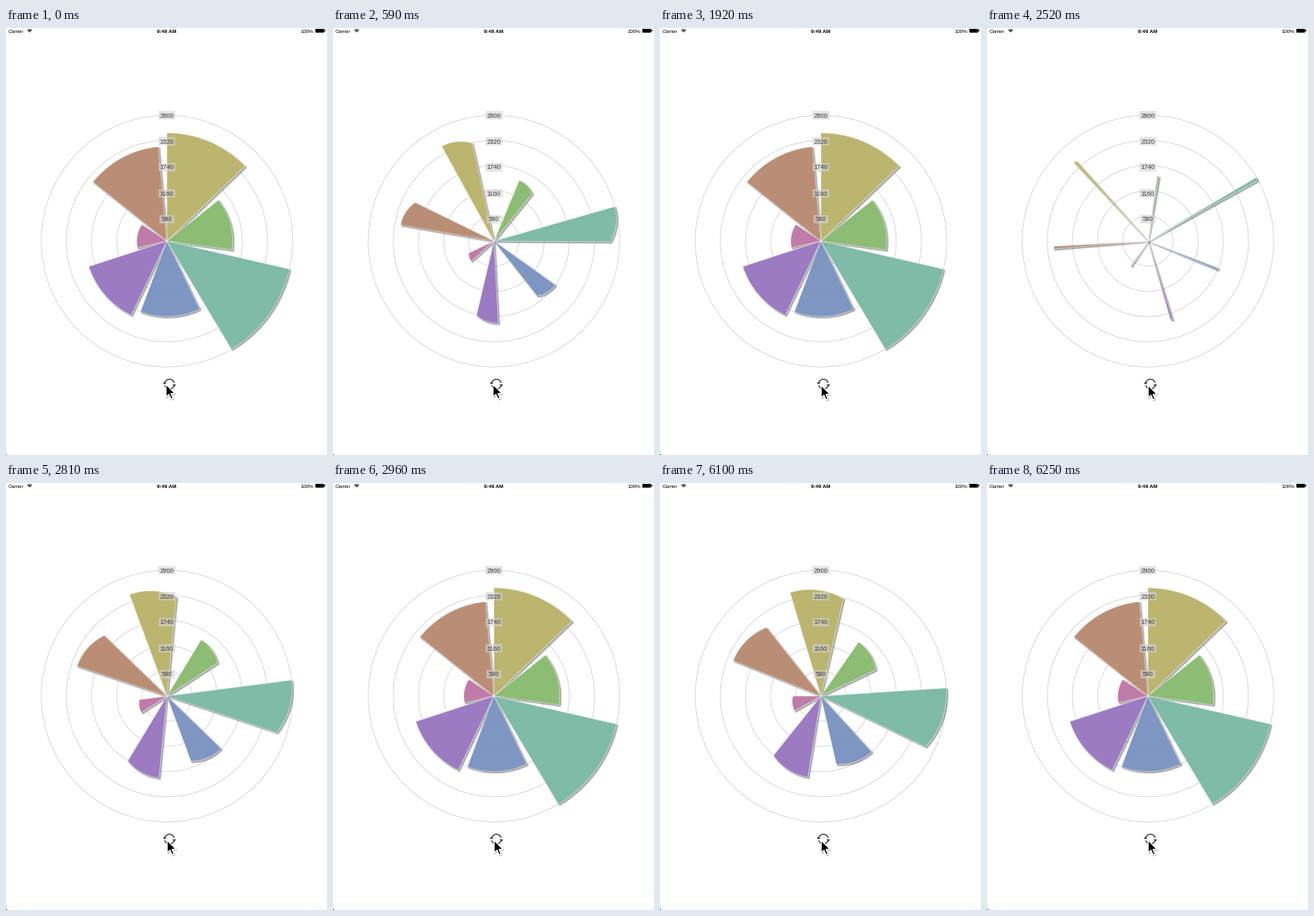
A matplotlib script for the animation above (8000 ms loop, 383x509 px).

```python
import numpy as np
import matplotlib.pyplot as plt
from matplotlib.animation import FuncAnimation
from matplotlib.patches import Circle, Polygon, Rectangle, Arc, Wedge, FancyBboxPatch

W, H, DPI = 383, 509, 100
PX = 72 / DPI
LOOP, STEP = 8000, 20

CX, CY = 192, 254
SLOT = 360 / 7
SPREAD = SLOT * 0.9
TURN = 45
DURATION = 520
STARTS = (300, 2440, 5700)
# the picture only refreshes at these moments
TICKS = np.array([0, 300, 450, 590, 740, 890, 1040, 1190, 1330, 1480, 1630,
                  1780, 1920, 2520, 2670, 2810, 2960, 5810, 5950, 6100, 6250])
POINTER = [(0, 191, 425), (1190, 195, 426), (1330, 203, 430), (1480, 216, 440),
           (1630, 199, 437), (1780, 195, 429), (1920, 192.3, 426)]
SECTORS = [(129, "#bdb56c"), (78.5, "#8bbd70"), (150, "#7cbca5"), (90, "#7b94c2"),
           (98, "#9a78c3"), (36, "#c079a8"), (113, "#bb8c72")]

plt.rcParams["font.family"] = "Liberation Sans"
fig = plt.figure(figsize=(W / DPI, H / DPI), dpi=DPI, facecolor="white")
ax = fig.add_axes([0, 0, 1, 1])
ax.set_xlim(0, W)
ax.set_ylim(H, 0)
ax.axis("off")


def text(x, y, s, size, **kw):
    kw = {"ha": "center", "va": "center_baseline", **kw}
    return ax.text(x, y, s, fontsize=size * PX, **kw)


def shape(patch):
    return ax.add_patch(patch)


def draw_status_bar():
    text(3, 3.6, "Carrier", 6.2, ha="left", color="black")
    text(192, 3.6, "9:49 AM", 6.1, weight="bold")
    text(367, 3.6, "100%", 6.2, ha="right", color="black")
    for r in (1.2, 2.7, 4.2):
        shape(Wedge((28.2, 5.6), r, 225, 315, width=0.9, color="black", lw=0))
    shape(FancyBboxPatch((369.5, 1.4), 9.6, 3.6, fc="black", ec="black", lw=0.5 * PX,
                         boxstyle="round,pad=0.2,rounding_size=0.6"))
    shape(Rectangle((380, 2.4), 1, 1.8, color="black", lw=0))


def draw_scale():
    for k in range(1, 6):
        shape(Circle((CX, CY), 30 * k, fill=False, ec="0.8", lw=0.7 * PX))
        y = 228 - 31 * (k - 1)
        half = 9 if k == 1 else 10.2
        shape(Rectangle((CX - half, y - 4.6), 2 * half, 9.2, fc="0.82", alpha=0.6,
                        lw=0, zorder=5))
        text(CX, y, str(580 * k), 7.6, color="0.25", zorder=6)


def draw_refresh():
    x, y, r, ink = 195, 424.5, 5.8, "0.25"
    for lo, hi in ((190, 345), (10, 165)):
        shape(Arc((x, y), 2 * r, 2 * r, theta1=lo, theta2=hi, color=ink,
                  lw=1.3 * PX, zorder=7))
    for side in (-1, 1):
        hx, hy = x + side * r, y + side * 1.2
        head = [(hx - 2.2, hy - side), (hx + 2.2, hy - side), (hx, hy + side * 2.2)]
        shape(Polygon(head, color=ink, lw=0, zorder=7))


def unit(deg):
    a = np.radians(deg)
    return np.stack([np.sin(a), -np.cos(a)], axis=-1)


def sector_path(i, q):
    """Sector outline whose arc opens out of its leading corner while it turns."""
    first = SLOT * i - TURN * (1 - q)
    arc = (1 - q) * unit(first) + q * unit(first + np.linspace(0, SPREAD, 40))
    return np.vstack([[CX, CY], [CX, CY] + SECTORS[i][0] * arc])


ARROW = np.array([(0, 0), (0, 14.6), (3.4, 11.6), (5.8, 17), (8.1, 16),
                  (5.7, 10.7), (10.4, 10.6)])

draw_status_bar()
draw_scale()
draw_refresh()
corner = shape(Rectangle((0, 508), 1, 1, color="0.3", lw=0))

shadows, fills = [], []
for _, color in SECTORS:
    shadows.append([shape(Polygon([(0, 0)] * 3, fc="0.35", ec="0.35", alpha=0.16,
                                  lw=w * PX, joinstyle="round", zorder=2))
                    for w in (0, 1.2, 2.4)])
    fills.append((shape(Polygon([(0, 0)] * 3, fc=color, alpha=0.95, lw=0, zorder=3)),
                  shape(Polygon([(0, 0)] * 3, fill=False, ec="white", alpha=0.4,
                                lw=PX, joinstyle="round", zorder=4))))

arrow_shade = shape(Polygon(ARROW, color="0.4", alpha=0.25, lw=2 * PX, zorder=8))
arrow = shape(Polygon(ARROW, fc="black", ec="white", lw=1.1 * PX, zorder=9))


def progress(t):
    begun = [s for s in STARTS if s <= t]
    if not begun:
        return 1.0
    return min(1.0, (t - begun[-1]) / DURATION) ** 1.75


def draw(frame):
    t = TICKS[TICKS <= frame * STEP + STEP / 2][-1]
    q = progress(t)
    for i, (blur, parts) in enumerate(zip(shadows, fills)):
        path = sector_path(i, q)
        for p in blur:
            p.set_xy(path + (1.5, 1.5))
            p.set_visible(q > 0.01)
        for p in parts:
            p.set_xy(path)
            p.set_visible(q > 0.01)
    _, x, y = [p for p in POINTER if p[0] <= t][-1]
    arrow.set_xy(ARROW + (x, y))
    arrow_shade.set_xy(ARROW + (x + 0.8, y + 1.2))
    corner.set_color("0.3" if t < 1040 else "0.1")
    return []


anim = FuncAnimation(fig, draw, frames=LOOP // STEP, interval=STEP,
                     init_func=lambda: draw(0), repeat=True, repeat_delay=0)
plt.show()
```
